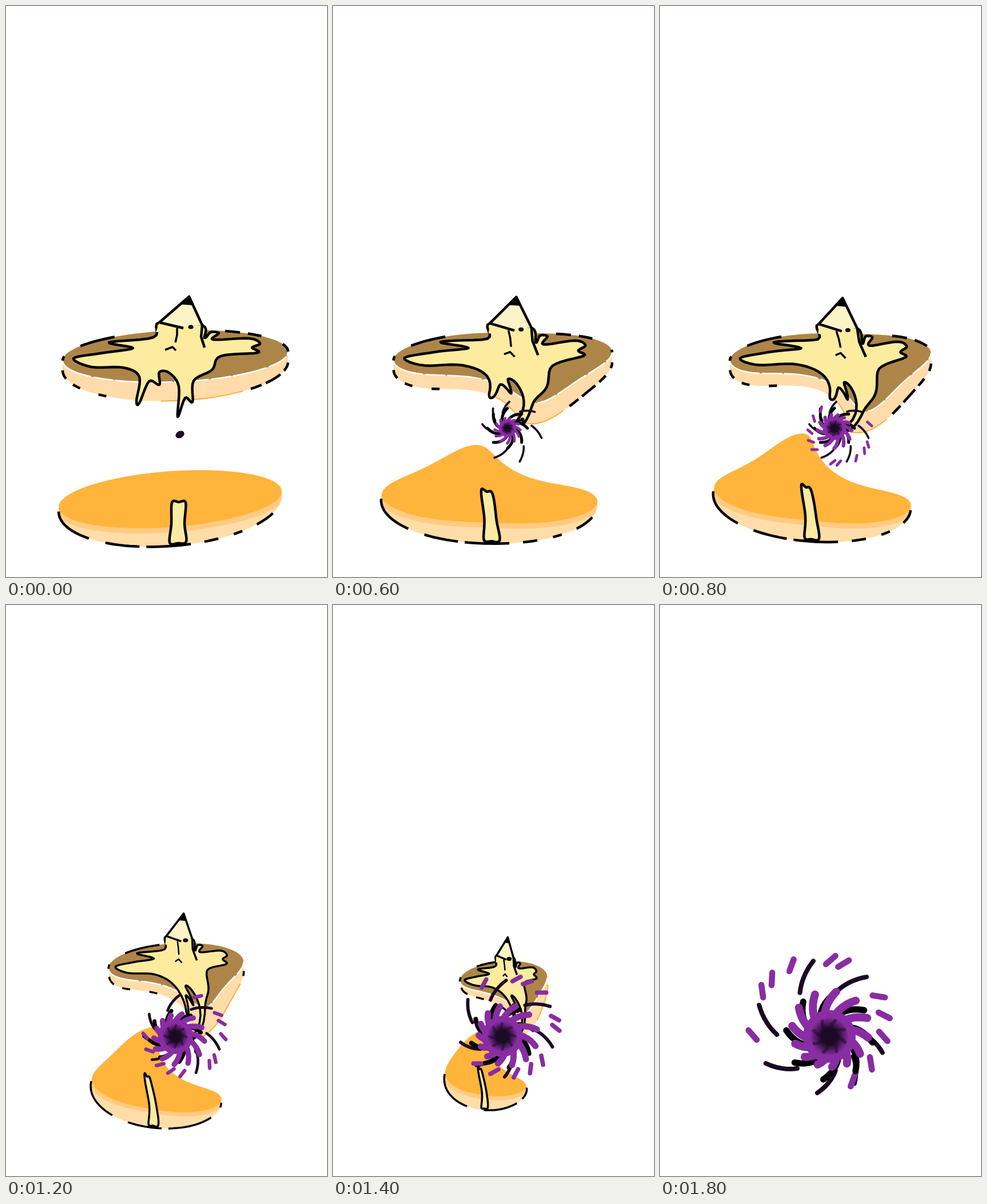
Recreate the animation shown at these times as an HTML page with a canvas. Size 561 px wide and 998 px high, loop 2000 ms.

```html
<!DOCTYPE html>
<html lang="en">
<head>
<meta charset="utf-8">
<title>Pancakes and the vortex</title>
<style>
html, body { margin: 0; width: 100%; height: 100%; overflow: hidden; background: #fff; }
canvas { display: block; width: 100%; height: 100%; }
</style>
</head>
<body>
<canvas id="stage" width="561" height="998"></canvas>
<script>
const ctx = document.getElementById('stage').getContext('2d');
const { PI, sin, cos, min, max, exp, hypot, atan2 } = Math;
const PURPLE = '#892da3', DARK = '#1b0a24', BLACK = '#000';
const rad = deg => deg * PI / 180;
const range = (n, f) => Array.from({ length: n }, (_, i) => f(i));

const UPPER = { x: 296, y: 612, rx: 197, ry: 45, slope: -.04, rim: 17, depth: 16 };
const LOWER = { x: 287, y: 862, rx: 195, ry: 49, slope: -.07, rim: 8, depth: 25 };
const points = text => text.split(' ').map(p => p.split(',').map(Number));
const BUTTER = smooth(points(
  '118,616 165,607 222,598 180,588 258,579 268,553 343,558 347,580 358,570 372,572 362,583 ' +
  '425,581 444,590 430,597 440,606 375,612 360,636 328,655 326,692 313,685 300,718 302,665 ' +
  '285,641 268,640 268,662 250,656 233,694 228,690 233,648 205,632 150,631'));
const STRIP = smooth(points('290,868 302,867 314,868 312,905 315,936 300,939 286,938 289,905'));
const [APEX, LEFT, RIGHT] = points('320,508 268,553 343,558');

// Angles of the strokes flying around the vortex.
const ARCS = [-124, -80, -5, 40, 80, 135, 182];
const DASHES = [181, 214, 225, 242, 271, 281, 321, 339, 0, 33, 62];

// Closed Catmull-Rom curve, as a dense polyline.
function smooth(p) {
  const n = p.length, at = i => p[(i + n) % n];
  return p.flatMap((b, i) => {
    const a = at(i - 1), c = at(i + 1), d = at(i + 2);
    return range(6, k => {
      const t = k / 6;
      return [0, 1].map(j => b[j] + t / 2 * (c[j] - a[j] +
        t * (2 * a[j] - 5 * b[j] + 4 * c[j] - d[j] + t * (3 * b[j] - a[j] - 3 * c[j] + d[j]))));
    });
  });
}

// Squeeze towards the vortex, then twirl and pinch what is near it.
function warper(n) {
  const [cx, cy] = centre(n);
  const squeeze = max(0, (n - 2) / 6.5) ** 1.9;
  const sx = 1 - squeeze, sy = 1 - .8 * squeeze ** 2;
  const twist = min(1, n / 5) ** 1.7, reach = 30 + 68 * sx;
  return (p, spin = 0) => p.map(([x, y]) => {
    const dx = (x - cx) * sx, dy = (y - cy) * sy, r = hypot(dx, dy);
    const near = exp(-((r / reach) ** 2));
    const a = atan2(dy, dx) + rad(twist * (160 * near + spin));
    const d = r * (1 - .9 * Math.sqrt(twist) * near);
    return [cx + d * cos(a), cy + d * sin(a)];
  });
}

const centre = n => n < 6 ? [305, 738] : [296, 754];

function trace(p, closed) {
  ctx.beginPath();
  p.forEach(q => ctx.lineTo(...q));
  if (closed) ctx.closePath();
}

function fill(p, color) {
  trace(p, true);
  ctx.fillStyle = color;
  ctx.fill();
}

function line(p, color, width, dash = [], closed = false) {
  trace(p, closed);
  ctx.setLineDash(dash);
  ctx.strokeStyle = color;
  ctx.lineWidth = width;
  ctx.stroke();
  ctx.setLineDash([]);
}

function dot(x, y, rx, ry, tilt, color) {
  ctx.beginPath();
  ctx.ellipse(x, y, rx, ry, tilt, 0, 7);
  ctx.fillStyle = color;
  ctx.fill();
}

// Left-to-right edge of a pancake: side -1 is the back, 1 the front.
function edge(c, side, thick = 0) {
  return range(61, i => {
    const a = PI * (1 - i / 60), dx = c.rx * cos(a);
    return [c.x + dx, c.y + side * c.ry * sin(a) + c.slope * dx + thick * (c.rim + c.depth * sin(a))];
  });
}

const between = (a, b) => [...a, ...[...b].reverse()];

function lowerPancake(warp, ink) {
  const put = p => warp(p, 14);
  const back = put(edge(LOWER, -1)), front = put(edge(LOWER, 1)), base = put(edge(LOWER, 1, 1));
  fill(between(back, base), '#ffdda8');
  ctx.save();
  trace(between(back, base), true);
  ctx.clip();
  line(front, '#ffcb82', ink * 4);
  fill(between(back, front), '#ffb43c');
  ctx.restore();
  line(base, BLACK, ink, [75, 30, 60, 12, 78, 24, 25, 28, 16, 28, 34, 90]);
  fill(put(STRIP), '#faeaa2');
  line(put(STRIP), BLACK, ink, [], true);
}

function upperPancake(warp, ink) {
  const back = warp(edge(UPPER, -1)), front = warp(edge(UPPER, 1)), base = warp(edge(UPPER, 1, 1));
  const stroke = (text, width) => line(warp(points(text)), BLACK, width);
  fill(between(back, base), '#ffdcaa');
  fill(between(back, front), '#ae8549');
  line(base, '#ffae3c', 2, [0, 190, 145, 300]);
  line(front, '#fff', 2.5, [60, 5, 35, 3]);
  line(back, BLACK, ink, [8, 34, 62, 194, 26, 14, 24, 40, 20, 99]);
  line(base, BLACK, ink, [16, 16, 14, 34, 14, 255, 20, 8, 30, 9]);
  fill(warp(BUTTER), '#fdec9f');
  line(warp(BUTTER), BLACK, ink, [], true);

  // The corner of the pat, with its black tip.
  const near = p => p.map((v, j) => APEX[j] + (v - APEX[j]) * .3);
  fill(warp([APEX, LEFT, [300, 561], RIGHT]), '#fcf3c8');
  fill(warp([LEFT, [300, 563], RIGHT, [343, 570], [262, 570]]), '#fdec9f');
  line(warp([LEFT, APEX, RIGHT]), BLACK, ink);
  fill(warp([APEX, near(LEFT), near(RIGHT)]), BLACK);
  stroke('268,553 310,563', ink);
  stroke('299,563 299,575 296,588', ink - 1);
  stroke('278,601 291,596 297,602', ink - 1);
  stroke('343,558 341,578 347,597', ink);
  dot(...warp([[323, 561]])[0], 4.5, 3.5, 0, BLACK);
}

// A stroke that spirals outwards.
function arm(a0, r0, a1, r1, width, color) {
  line(range(9, i => {
    const t = i / 8, a = rad(a0 + (a1 - a0) * t), r = r0 + (r1 - r0) * t;
    return [r * cos(a), r * sin(a)];
  }), color, width);
}

function vortex(n) {
  const core = n / 9, ring = n < 3 ? .2 : .46 + .135 * max(0, n - 5);
  const turn = 172 * min(1, (9 - n) / 4) ** 1.3;
  ctx.save();
  ctx.translate(...centre(n));
  ctx.rotate(rad(turn));
  ctx.save();
  ctx.scale(ring, ring);
  if (n > 2) for (const a of ARCS) {
    const lean = cos(rad(a - 210));
    arm(a, 74 + 20 * lean, a + 22, 115 + 22 * lean, 8, DARK);
  }
  if (n > 3) for (const a of DASHES) {
    const r = 114 + 28 * cos(rad(a - 225)), way = rad(a + 48);
    const x = r * cos(rad(a)), y = r * sin(rad(a)), dx = 11 * cos(way), dy = 11 * sin(way);
    line([[x - dx, y - dy], [x + dx, y + dy]], PURPLE, 10.5);
  }
  for (let a = -127; a < 233; a += 45) arm(a - 40, 30, a, 76, 11, BLACK);
  ctx.restore();

  ctx.scale(core, core);
  dot(0, 0, 46, 46, 0, PURPLE);
  for (let k = 0; k < 13; k++) {
    const a = k * 27.7 - 109;
    arm(a - 32, 20, a, 66 + 13 * cos(rad(a + 80)), 14, PURPLE);
  }
  for (let a = 0; a < 360; a += 45) arm(a, 8, a + 20, 29, 6, '#1b0a2480');
  const glow = ctx.createRadialGradient(0, 0, 14, 0, 0, 34);
  glow.addColorStop(0, DARK);
  glow.addColorStop(1, '#1b0a2400');
  ctx.fillStyle = glow;
  ctx.fillRect(-40, -40, 80, 80);
  ctx.restore();
}

function draw(now) {
  const beat = Math.floor(now % 2000 / 200);
  const n = beat === 2 ? 1 : beat; // the second drawing is held for two beats
  ctx.fillStyle = '#fff';
  ctx.fillRect(0, 0, 561, 998);
  ctx.lineJoin = 'round';
  if (n < 9) {
    const warp = warper(n), ink = n < 6 ? 4.5 : 3.5;
    ctx.lineCap = 'butt';
    lowerPancake(warp, ink);
    upperPancake(warp, ink);
  }
  ctx.lineCap = 'round';
  if (n) vortex(n);
  else dot(304, 749, 8, 6, -.5, '#1d0a24');
}

const start = performance.now();
function tick() {
  draw(performance.now() - start);
  requestAnimationFrame(tick);
}
tick();
</script>
</body>
</html>
```
